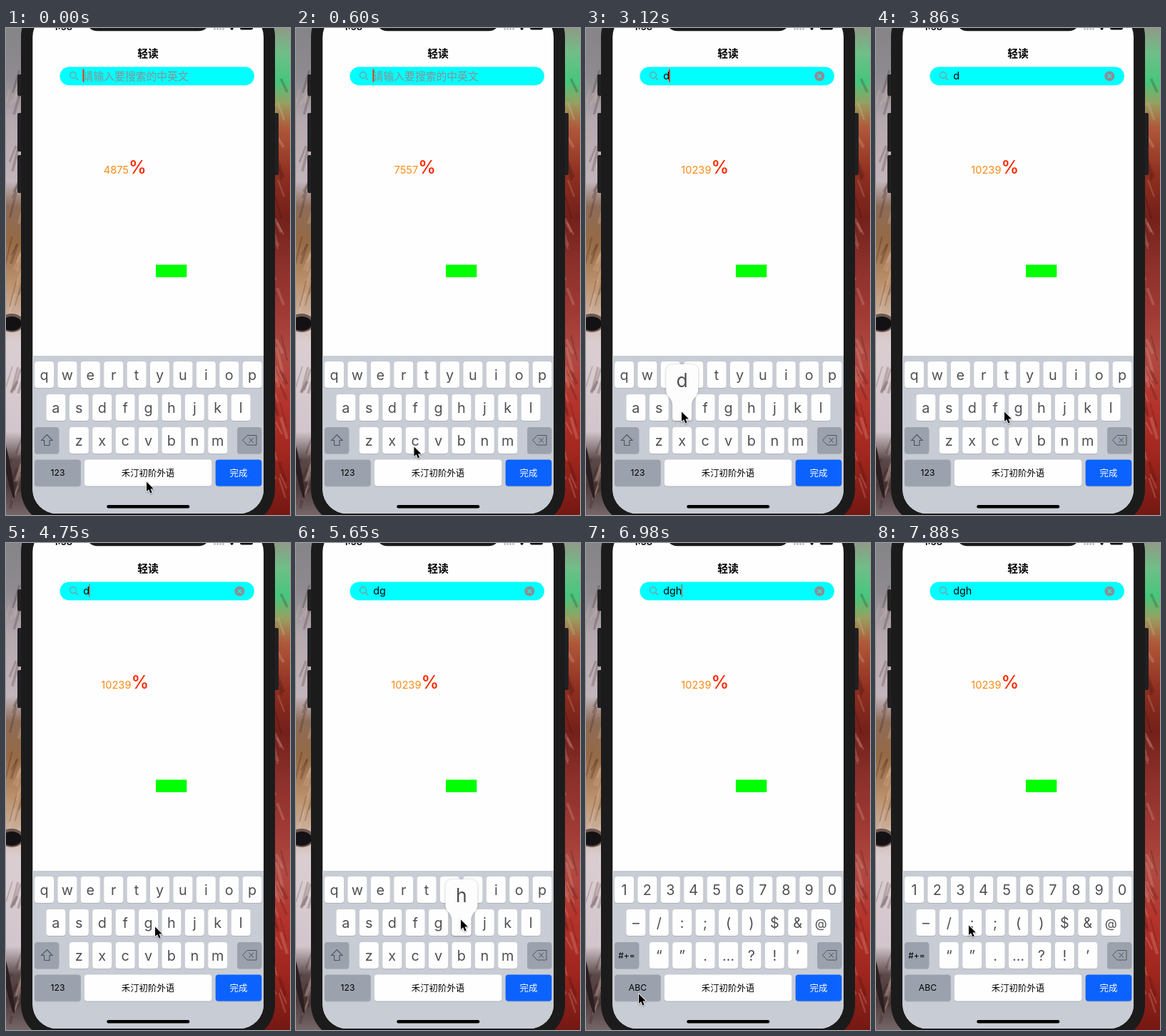
An HTML page with a canvas that plays this animation: 398x682 px, repeating every 8000 ms.

```html
<!DOCTYPE html>
<html lang="zh">
<head>
<meta charset="utf-8">
<title>轻读</title>
<style>
html, body { margin: 0; width: 100%; height: 100%; overflow: hidden; background: #1b1b1c; }
canvas { display: block; width: 398px; height: 682px; }
</style>
</head>
<body>
<canvas id="stage" width="398" height="682"></canvas>
<script>
const ctx = document.getElementById('stage').getContext('2d');
const LOOP = 8000, STEP = 148.6;
const SANS = 'Inter, "Noto Sans CJK SC", sans-serif';
const CJK = '"Noto Sans CJK SC", "Noto Sans CJK JP", sans-serif';
const LETTERS = ['qwertyuiop', 'asdfghjkl', 'zxcvbnm'];
const SYMBOLS = ['1234567890', '–/:;()$&@', '“”.…?!’'];
const ROW_X = [40, 56.4, 88.8], ROW_Y = [467, 513, 559], PITCH = 32.4;
const KEY_W = 27, KEY_H = 37;
const INK = '#505054', GREY = '#8e8e93', RED = '#ff2600';

// Pointer stops: step, x, y
const POINTER = [
  [0, 197, 635], [8, 134, 537], [23, 134, 537], [26, 180, 537], [27, 180, 537],
  [32, 209, 537], [35, 209, 537], [38, 231, 527], [39, 231, 527],
  [43, 67, 580], [45, 74, 631], [47, 74, 631], [53, 130, 535]
];

function box(x, y, w, h, r, fill) {
  ctx.beginPath();
  ctx.roundRect(x, y, w, h, r);
  ctx.fillStyle = fill;
  ctx.fill();
}

function label(str, x, y, size, color, align = 'center', weight = 400, family = SANS) {
  ctx.font = `${weight} ${size}px ${family}`;
  ctx.textAlign = align;
  ctx.fillStyle = color;
  ctx.fillText(str, x, y);
}

function line(points, color, width, close) {
  ctx.beginPath();
  points.forEach(([x, y]) => ctx.lineTo(x, y));
  if (close) ctx.closePath();
  ctx.strokeStyle = color;
  ctx.lineWidth = width;
  ctx.stroke();
}

function blob(x, y, rx, ry, color, turn = 0) {
  ctx.beginPath();
  ctx.ellipse(x, y, rx, ry, turn, 0, 7);
  ctx.fillStyle = color;
  ctx.fill();
}

function strip(x, w, stops) {
  const g = ctx.createLinearGradient(0, 0, 0, 682);
  stops.forEach(([y, c]) => g.addColorStop(y / 682, c));
  ctx.fillStyle = g;
  ctx.fillRect(x, 0, w, 682);
}

function wallpaper() {
  strip(0, 199, [[0, '#858487'], [70, '#8f8b90'], [130, '#b5a9ae'], [215, '#c2b5bb'],
    [250, '#8d6c58'], [300, '#966a45'], [360, '#bd946f'], [395, '#c8aa94'],
    [440, '#d9ced2'], [565, '#d2c6cc'], [605, '#5a4848'], [640, '#4c3a3a'], [682, '#766669']]);
  strip(199, 199, [[0, '#8f9a86'], [35, '#6fbf88'], [75, '#47c67c'], [105, '#97a060'],
    [140, '#b0583a'], [205, '#8f2f20'], [265, '#74201a'], [330, '#8c302b'],
    [400, '#a03a34'], [460, '#b04a42'], [525, '#b5342c'], [600, '#a0261e'], [682, '#741812']]);
  // Slanted fur strokes
  let seed = 7;
  const rnd = () => (seed = seed * 16807 % 2147483647) / 2147483647;
  for (let i = 0; i < 90; i++) {
    const left = i % 2, y = 90 + rnd() * 590, x = rnd() * 22 + (left ? -4 : 374);
    const lean = left ? 9 : -9, tone = rnd() < 0.55 ? 'rgba(40,12,10,' : 'rgba(245,205,190,';
    line([[x, y], [x + lean, y - 14 - rnd() * 24]], tone + '.2)', 1.5 + rnd() * 3);
  }
  blob(8, 413, 17, 13, '#6b5650');
  blob(8, 414, 14, 10, '#131113');
  blob(2, 612, 4, 48, '#2a1e20', -0.2);
}

function phone() {
  [[16, 65, 30], [16, 119, 54], [16, 178, 53], [372, 119, 87]]
    .forEach(([x, y, h]) => box(x, y, 10, h, 2, '#202022'));
  box(21, -38, 356, 734, 50, '#1b1b1c');
  box(37.3, -21.6, 323.7, 701.6, 34, '#fefefe');
  box(112, -30, 174, 34.3, 16, '#1b1b1c');
  label('1:58', 80, 2.8, 13, '#000', 'center', 600);
  for (let i = 0; i < 4; i++) blob(292.5 + i * 4, 1.5, 1.2, 1.2, '#a5a5a8');
  blob(316.5, 0.8, 2, 2, '#000');
  box(328, -7, 18, 9.5, 2.5, '#111');
  label('轻读', 199, 41, 14.8, '#000', 'center', 700, CJK);
  box(210, 331.6, 43.3, 17.4, 0, '#00ff00');
}

function counter(k) {
  const num = String(Math.round(4875 + 5364 * Math.min(k / 8, 1)));
  ctx.font = `400 14.6px ${SANS}`;
  const numW = ctx.measureText(num).width;
  ctx.font = `500 25px ${SANS}`;
  const x = 166.8 - (numW + ctx.measureText('%').width) / 2;
  label(num, x, 203.5, 14.6, '#ff8a14', 'left');
  label('%', x + numW, 203.5, 25, RED, 'left', 500);
}

function caretAlpha(k) {
  if (k < 1) return 1;
  const start = k < 21 ? 11 : k < 34 ? 22 : k < 40 ? 34 : 40;
  const since = (k - start) * STEP;
  const p = k === 21 ? 0 : (since + 3210) % 1070;
  if (p < 370) return 1;
  return p < 520 || p > 865 ? 0.6 : 0;
}

function searchBar(k) {
  const typed = 'dgh'.slice(0, k < 21 ? 0 : k < 34 ? 1 : k < 40 ? 2 : 3);
  box(75.5, 54.5, 272.4, 25.8, 12.9, '#00ffff');
  ctx.beginPath();
  ctx.arc(94, 66, 4.4, 0, 7);
  ctx.strokeStyle = GREY;
  ctx.lineWidth = 1.1;
  ctx.stroke();
  line([[97.2, 69.2], [101, 73]], GREY, 1.2);
  let x = 108.3;
  if (typed) {
    label(typed, 108.2, 72.3, 14.4, '#000', 'left');
    x = 108 + ctx.measureText(typed).width;
    blob(327.3, 67.4, 7, 7, GREY);
    line([[324.7, 64.8], [329.9, 70]], '#00ffff', 1.2);
    line([[329.9, 64.8], [324.7, 70]], '#00ffff', 1.2);
  } else {
    label('请输入要搜索的中英文', 107.7, 72.7, 14.8, GREY, 'left', 400, CJK);
  }
  ctx.globalAlpha = caretAlpha(k);
  box(x - 0.8, 57.8, 1.8, 18, 0.8, RED);
  ctx.globalAlpha = 1;
}

function key(x, y, w, fill) {
  box(x, y + 1, w, KEY_H, 4, '#adb1b9');
  box(x, y, w, KEY_H, 4, fill);
}

function popup(ch) {
  const i = LETTERS[1].indexOf(ch);
  const c = ROW_X[1] + i * PITCH + KEY_W / 2, n = KEY_W / 2, b = 22.5;
  ctx.save();
  ctx.shadowColor = 'rgba(0,0,0,.28)';
  ctx.shadowBlur = 3;
  ctx.shadowOffsetY = 0.5;
  ctx.beginPath();
  ctx.moveTo(c - b + 9, 471);
  ctx.arcTo(c + b, 471, c + b, 500, 9);
  ctx.lineTo(c + b, 507);
  ctx.bezierCurveTo(c + b, 517, c + n, 517, c + n, 529);
  ctx.arcTo(c + n, 550, c, 550, 4);
  ctx.arcTo(c - n, 550, c - n, 529, 4);
  ctx.lineTo(c - n, 529);
  ctx.bezierCurveTo(c - n, 517, c - b, 517, c - b, 507);
  ctx.arcTo(c - b, 471, c - b + 9, 471, 9);
  ctx.fillStyle = '#fdfdfd';
  ctx.fill();
  ctx.restore();
  label(ch, c, 503, 26.5, INK, 'center', 400);
}

function keyboard(k) {
  const symbols = k >= 46, dark = '#9ca2ad', icon = '#50545c';
  ctx.save();
  ctx.beginPath();
  ctx.roundRect(37.3, -21.6, 323.7, 701.6, 34);
  ctx.clip();
  ctx.fillStyle = '#c8ccd4';
  ctx.fillRect(37, 459, 325, 223);
  ctx.restore();

  (symbols ? SYMBOLS : LETTERS).forEach((row, r) => [...row].forEach((ch, i) => {
    const x = ROW_X[r] + i * PITCH, y = ROW_Y[r];
    key(x, y, KEY_W, '#fefefe');
    label(ch, x + KEY_W / 2, y + 26, ch === '@' ? 17.5 : 19.8, INK, 'center', 400);
  }));

  key(40, 559, 34.3, dark);
  key(324, 559, 34.3, dark);
  if (symbols) {
    label('#+=', 57, 581.5, 12, '#000');
  } else {
    line([[57.3, 569.5], [65, 577.5], [61, 577.5], [61, 584.5], [53.6, 584.5],
      [53.6, 577.5], [49.6, 577.5]], icon, 1.1, true);
  }
  line([[331.5, 577.3], [338, 570.5], [351, 570.5], [351, 584], [338, 584]], icon, 1, true);
  line([[340.5, 573.8], [347, 580.8]], icon, 1);
  line([[347, 573.8], [340.5, 580.8]], icon, 1);

  key(40, 604.5, 64.7, dark);
  key(110, 604.5, 178.3, '#fefefe');
  key(293.7, 604.5, 64.6, '#0b62ff');
  label(symbols ? 'ABC' : '123', 72.5, 627.3, 12.2, '#000');
  label('禾汀初阶外语', 199, 627.5, 12.4, '#000', 'center', 400, CJK);
  label('完成', 326, 627.5, 12.4, '#fff', 'center', 400, CJK);
  box(141.3, 668, 116, 4.4, 2.2, '#000');

  if (k === 21) popup('d');
  if (k === 33) popup('g');
  if (k === 38 || k === 39) popup('h');
}

function pointer(k) {
  const i = POINTER.findIndex((p, n) => n === POINTER.length - 1 || POINTER[n + 1][0] >= k);
  const a = POINTER[i], b = POINTER[i + 1] || a;
  const u = (k - a[0]) / (b[0] - a[0] || 1), e = u * u * (3 - 2 * u);
  ctx.save();
  ctx.translate(a[1] + (b[1] - a[1]) * e, a[2] + (b[2] - a[2]) * e);
  ctx.shadowColor = 'rgba(0,0,0,.35)';
  ctx.shadowBlur = 2;
  ctx.shadowOffsetY = 1;
  ctx.lineJoin = 'round';
  line([[0, 0.5], [0, 14], [3.1, 11.2], [5.4, 16.4], [7.7, 15.4], [5.5, 10.4], [9.8, 10.2]],
    '#fff', 1.8, true);
  ctx.shadowColor = 'transparent';
  ctx.fillStyle = '#000';
  ctx.fill();
  ctx.restore();
}

const begin = performance.now();

function frame(now) {
  const t = Math.max(0, now - begin) % LOOP;
  const k = Math.min(53, Math.floor((t + 12) / STEP));
  wallpaper();
  phone();
  counter(k);
  searchBar(k);
  keyboard(k);
  pointer(k);
  requestAnimationFrame(frame);
}
requestAnimationFrame(frame);
</script>
</body>
</html>
```
